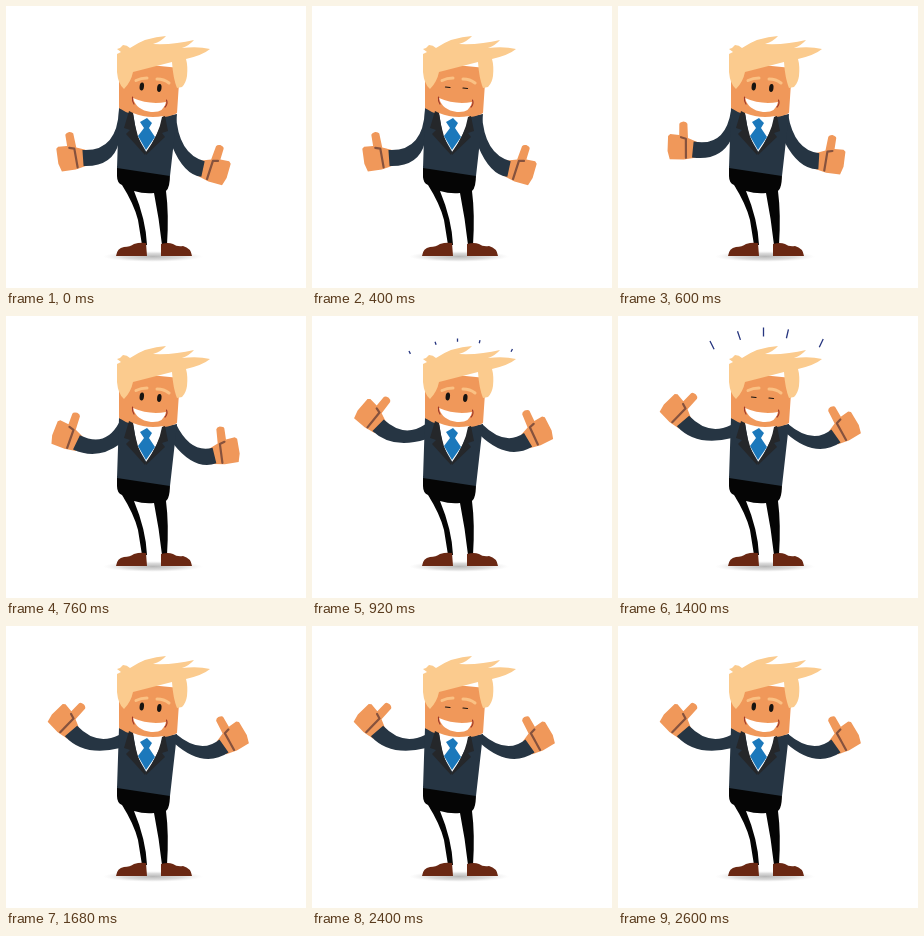
Write an HTML page that moves like this. It is 300 px wide and 282 px high and loops after 3.2 s.

```html
<!DOCTYPE html>
<html lang="en">
<head>
<meta charset="utf-8">
<title>Thumbs up</title>
<style>
  html, body { margin: 0; width: 100%; height: 100%; overflow: hidden; background: #fff; }
  svg { display: block; width: 100vw; height: 100vh; }
  .suit { fill: #263543; }
  .skin { fill: #f0985a; }
  .hair { fill: #fbcb8e; }
  .lapel { fill: #25272a; }
  .shoe { fill: #6a2813; }
  .line { fill: none; stroke-linecap: round; stroke-linejoin: round; }
</style>
</head>
<body>
<svg viewBox="0 0 300 282">
  <defs>
    <radialGradient id="shade">
      <stop offset="0" stop-color="#999" stop-opacity=".7"/>
      <stop offset=".6" stop-color="#bbb" stop-opacity=".5"/>
      <stop offset="1" stop-color="#ddd" stop-opacity="0"/>
    </radialGradient>
    <g id="hand">
      <path class="skin" d="M-3-8 L6-11 L8-25 Q9-27 12-27 Q16-26 16-24 L15-13 L24-13 L26-11 L25 4 L22 12 L8 11 L-3 8Z"/>
      <path class="line" stroke="#86523d" stroke-width="2.200" d="M13-11 L8-10 L6 9"/>
    </g>
  </defs>

  <ellipse cx="147" cy="250.500" rx="50" ry="5.500" fill="url(#shade)"/>
  <path fill="#050505" d="M111 160 L111 170 Q111 177 116 179 Q128 198 132 214 L136 239 L141 239 Q140 214 128 185 Q138 188 148 187 Q153 212 156 239 L161 239 Q163 208 160 185 Q164 182 164 168Z"/>
  <path class="shoe" d="M110 250 Q111 242 118 241 Q124 241 128 238 Q134 236 140 237 L141 250Z"/>
  <path class="shoe" d="M155 250 L155 238 Q162 236 167 238 Q171 241 177 240 Q185 242 186 250Z"/>

  <use id="leftHand" href="#hand"/>
  <use id="rightHand" href="#hand"/>
  <path id="leftArm" class="suit"/>
  <path id="rightArm" class="suit"/>
  <path class="suit" d="M113 102 L111 162 L164 170 L171 108 L150 112Z"/>

  <path class="skin" d="M113 56 L113 102 Q120 107 128 109 Q145 113 158 111 Q166 110 171 107 L174 62Z"/>
  <path fill="#fff" d="M127 107 Q142 113 157 110 L154 122 L141 147 L131 130Z"/>
  <path class="lapel" d="M123 105 L127 107 Q130 132 140 147 L139 149 L120 128 L124 124 L118 122Z"/>
  <path class="lapel" d="M156 111 L159 110 L162 125 L156 127 L159 131 L140 149 L140 146 Q153 129 156 111Z"/>
  <path fill="#1b78bb" d="M141 112 L146 117 L143 122 L149 131 L140 144 L132 130 L138 122 L134 116Z"/>

  <path class="hair" d="M111 66 L111 48 L115 46 L111 43 Q115 42 117 39 Q121 39 124 42 Q140 31 160 30 Q156 35 147 38 Q168 39 188 34 Q184 39 176 42 Q192 40 204 43 Q197 49 180 53 Q182 60 181 70 Q180 77 176 81 L171 82 Q167 72 166 56 L127 66 Q125 76 118 83 Q112 78 111 66Z"/>
  <g class="line" stroke="#fac184" stroke-width="3">
    <path d="M130 74.500 Q135 72 141 72"/>
    <path d="M151 73 Q158 73 163 77"/>
  </g>
  <g id="openEyes" fill="#171310">
    <ellipse cx="135.800" cy="80.500" rx="2.200" ry="4" transform="rotate(7 135.800 80.500)"/>
    <ellipse cx="153.300" cy="82" rx="2.200" ry="4" transform="rotate(7 153.300 82)"/>
  </g>
  <path id="closedEyes" class="line" stroke="#171310" stroke-width="1.200" d="M133.500 81 L138 81.500 M151 82 L155.500 82.500"/>
  <path fill="#fff" d="M127 92 Q143 99 160 96 Q158 107 145 106 Q130 104 127 92Z"/>
  <path class="line" stroke="#a03a2a" stroke-width="1.200" d="M126.500 91 Q126 95 128 98 M160.500 94 Q162 98 159 101"/>
  <path id="ticks" fill="none" stroke="#26357f" stroke-width="1.300"/>
</svg>

<script>
const LOOP = 3200, STEP = 40;
const el = id => document.getElementById(id);
const mix = (a, b, p) => a + (b - a) * p;
const mixPoint = (a, b, p) => a.map((v, i) => mix(v, b[i], p));
const show = (id, on) => el(id).setAttribute('display', on ? 'inline' : 'none');

// Every pair holds the lowered and the raised pose.
const arms = [
  { side: 'left', flip: -1, angle: [-4, 50], wrist: [[77, 152], [65, 105]],
    top: [[113, 104], [113, 109]], topBend: [[111, 146], [90, 120]],
    bottom: [[113, 136], [114, 122]], bottomBend: [[107, 161], [78, 131]] },
  { side: 'right', flip: 1, angle: [12, -35], wrist: [[197, 163], [218, 120]],
    top: [[170, 108], [170, 108]], topBend: [[172, 148], [195, 129]],
    bottom: [[166, 140], [168, 117]], bottomBend: [[178, 169], [197, 143]] }
];

// Start point and direction of each surprise tick.
const tickRays = [
  [99, 39, -.45, -.9], [124.5, 30, -.32, -.95], [145.5, 27, 0, -1],
  [167, 28.5, .22, -.97], [198.5, 37, .43, -.9]
];

function poseArm(arm, p) {
  const at = key => mixPoint(...arm[key], p);
  const angle = mix(...arm.angle, p), rad = angle * Math.PI / 180;
  const [x, y] = at('wrist');
  const cuff = d => [x - d * Math.sin(rad), y + d * Math.cos(rad)];
  el(arm.side + 'Hand').setAttribute('transform',
    `translate(${x} ${y}) rotate(${angle}) scale(${arm.flip} 1)`);
  el(arm.side + 'Arm').setAttribute('d',
    `M${at('top')} Q${at('topBend')} ${cuff(-8)} L${cuff(8)} Q${at('bottomBend')} ${at('bottom')}Z`);
}

function tickPath(t) {
  if (t < 840 || t >= 1680) return '';
  const u = (t - 800) / 840;
  const inner = 9 * u, outer = 17 * (1 - (1 - u) ** 2);
  return tickRays.map(([x, y, dx, dy]) =>
    `M${x + dx * inner} ${y + dy * inner} L${x + dx * outer} ${y + dy * outer}`).join('');
}

function draw(now) {
  const t = Math.floor(now % LOOP / STEP) * STEP;
  const lift = Math.min(1, Math.max(0, (t - 520) / 440));
  arms.forEach(arm => poseArm(arm, lift));

  const blink = t % 1000 >= 400 && t % 1000 < 600 && t < 3000;
  show('openEyes', !blink);
  show('closedEyes', blink);
  el('ticks').setAttribute('d', tickPath(t));
}

const start = performance.now();
function frame() {
  draw(performance.now() - start);
  requestAnimationFrame(frame);
}
frame();
</script>
</body>
</html>
```
